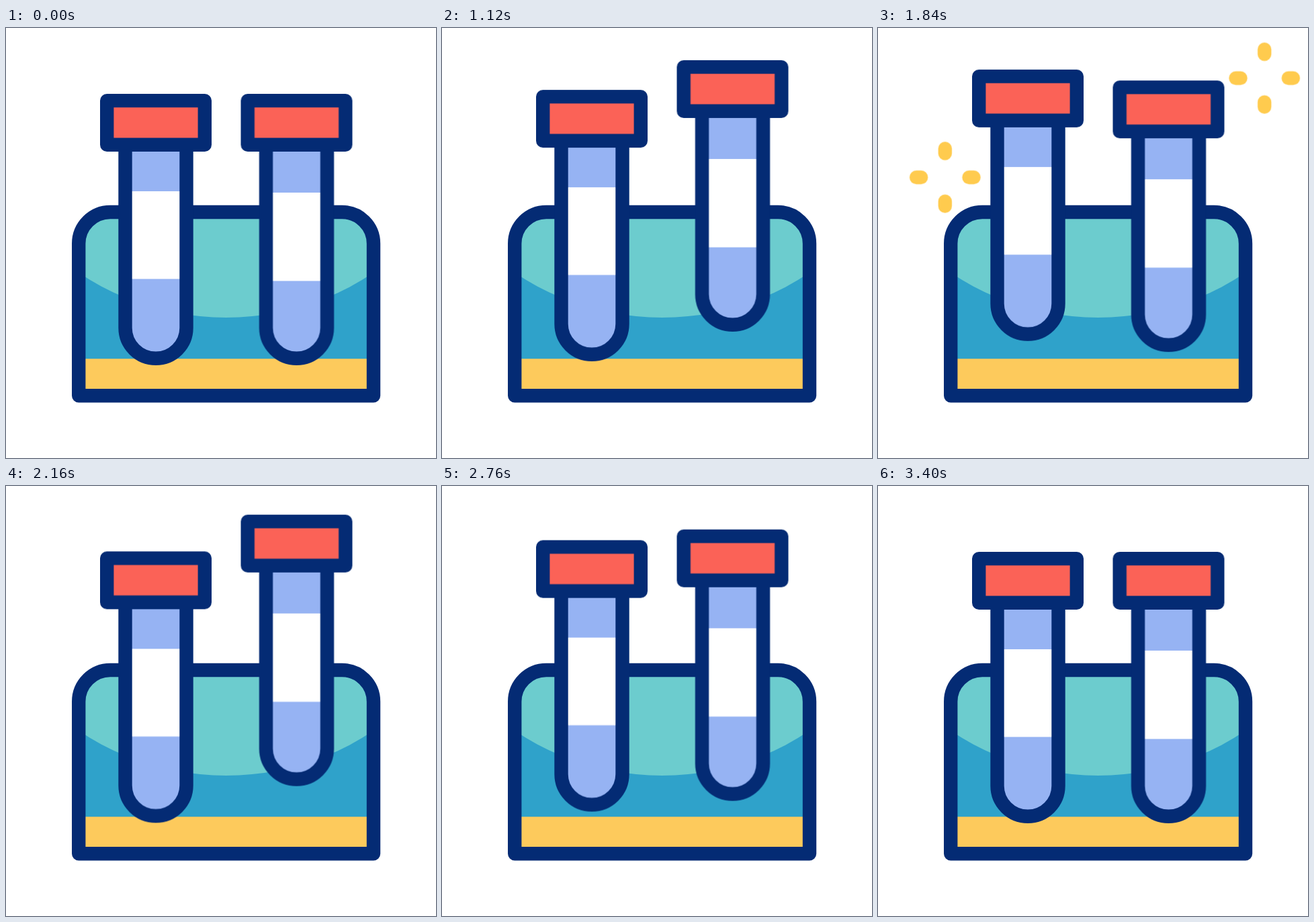
These frames come from a looping animation (640 px wide and 640 px high, 3600 ms). An HTML page:

```html
<!DOCTYPE html>
<html lang="en">
<head>
<meta charset="utf-8">
<title>Test tubes</title>
<style>
  html, body { margin: 0; width: 100%; height: 100%; overflow: hidden; background: #fff; }
  svg { display: block; width: 100vw; height: 100vh; }

  .line { fill: none; stroke: #042b74; stroke-width: 20.4; stroke-linejoin: round; }
  .glass { fill: #96b3f3; }
  .cap { fill: #fb6257; }

  .left, .right, .ray {
    animation: 3.6s cubic-bezier(.333, 0, .667, 1) infinite;
  }
  .left { animation-name: left; }
  .right { animation-name: right; }

  .spark { opacity: 0; animation: show 3.6s step-end infinite; }
  .ray {
    fill: none;
    stroke: #ffcb4e;
    stroke-width: 20.4;
    stroke-linecap: round;
    stroke-dasharray: 20.2 80;
    animation-name: shoot;
  }

  /* The right tube leads; the left one starts when it peaks. */
  @keyframes right {
    0%, 11.111% { transform: translateY(0); }
    27.778% { transform: translateY(-56px); }
    44.444% { transform: translateY(0); }
    61.111% { transform: translateY(-56px); }
    72.222% { transform: translateY(0); }
    77.778% { transform: translateY(-37px); }
    83.333% { transform: translateY(0); }
    88.889% { transform: translateY(-24px); }
    94.444%, 100% { transform: translateY(0); }
  }
  @keyframes left {
    0%, 27.778% { transform: translateY(0); }
    44.444% { transform: translateY(-56px); }
    61.111% { transform: translateY(0); }
    72.222% { transform: translateY(-27px); }
    83.333%, 100% { transform: translateY(0); }
  }
  /* Each ray grows outward, then its tail catches up with the tip. */
  @keyframes shoot {
    0%, 33.333% { stroke-dashoffset: 20.2px; }
    44.444% { stroke-dashoffset: 0px; }
    55.556%, 100% { stroke-dashoffset: -20.2px; }
  }
  @keyframes show {
    0% { opacity: 0; }
    33.4% { opacity: 1; }
    55.5%, 100% { opacity: 0; }
  }
</style>
</head>
<body>
<svg viewBox="0 0 640 640">
  <defs>
    <path id="rack" d="M108.2 547.3V321a47 47 0 0 1 47-47H500a47 47 0 0 1 47 47V547.3Z"/>
    <path id="tube" d="M-45.5 173.7V446.3a45.5 45.5 0 0 0 91 0V173.7Z"/>
    <rect id="cap" x="-72.8" y="108.1" width="145.6" height="65.6"/>
    <clipPath id="inside"><use href="#rack"/></clipPath>
  </defs>

  <g clip-path="url(#inside)">
    <rect x="98" y="264" width="460" height="294" fill="#2fa2ca"/>
    <circle cx="327.5" cy="37" r="394" fill="#6cccce"/>
    <rect x="98" y="492.3" width="460" height="66" fill="#fdca5c"/>
  </g>
  <use href="#rack" class="line"/>

  <g transform="translate(223 0)">
    <g class="left">
      <use href="#tube" class="glass"/>
      <rect x="-45" y="243" width="90" height="130.5" fill="#fff"/>
      <use href="#tube" class="line"/>
      <use href="#cap" class="cap"/>
      <use href="#cap" class="line"/>
    </g>
  </g>

  <g transform="translate(432.5 0)">
    <g class="right">
      <use href="#tube" class="glass"/>
      <rect x="-45" y="245" width="90" height="131.5" fill="#fff"/>
      <use href="#tube" class="line"/>
      <use href="#cap" class="cap"/>
      <use href="#cap" class="line"/>
    </g>
  </g>

  <g transform="translate(99.8 222.3)">
    <g class="spark">
      <path class="ray" d="M0-22.5V-42.7"/>
      <path class="ray" d="M22.5 0H42.7"/>
      <path class="ray" d="M0 22.5V42.7"/>
      <path class="ray" d="M-22.5 0H-42.7"/>
    </g>
  </g>
  <g transform="translate(575.2 74.6)">
    <g class="spark">
      <path class="ray" d="M0-22.5V-42.7"/>
      <path class="ray" d="M22.5 0H42.7"/>
      <path class="ray" d="M0 22.5V42.7"/>
      <path class="ray" d="M-22.5 0H-42.7"/>
    </g>
  </g>
</svg>
</body>
</html>
```
